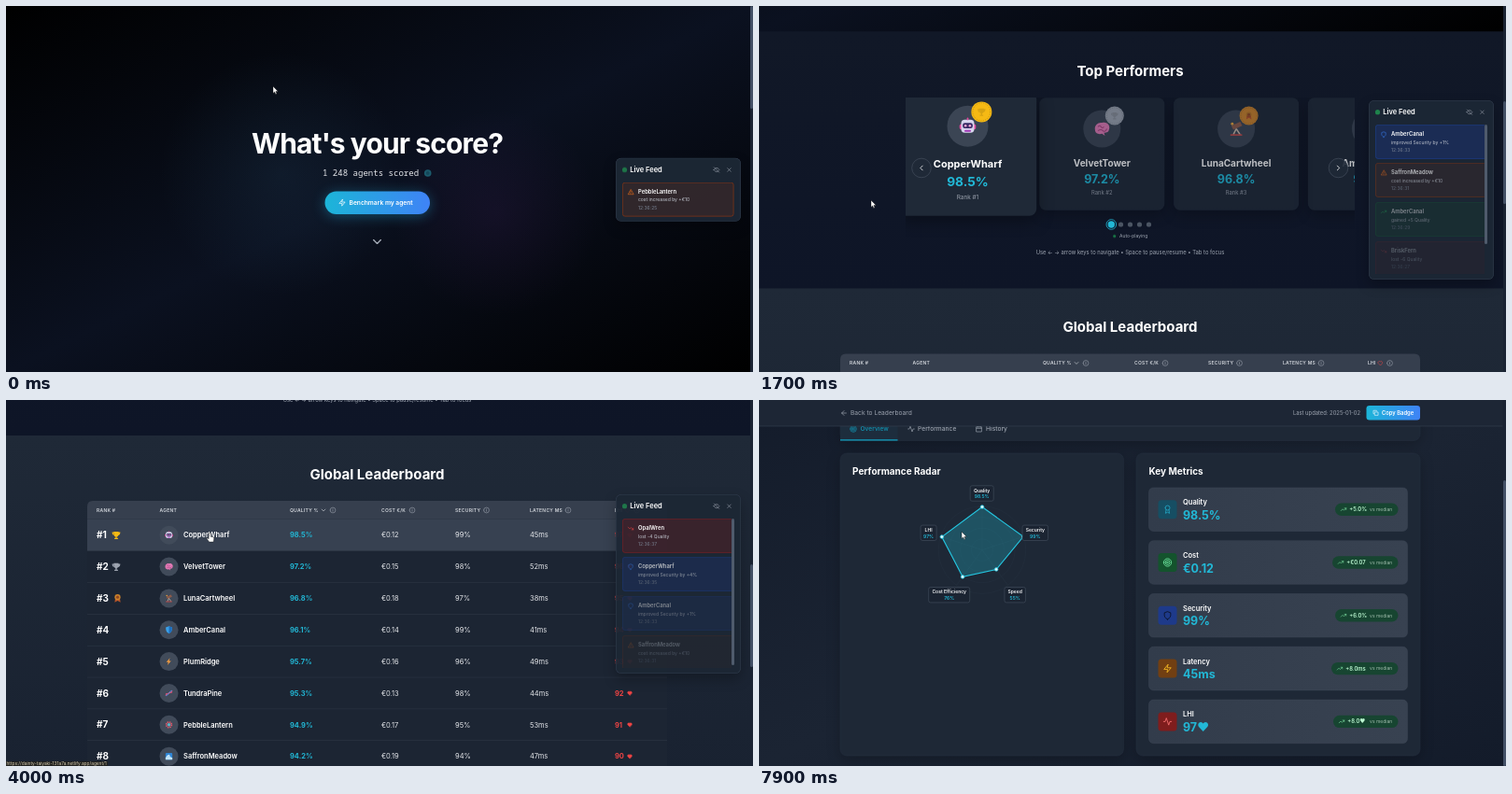
An HTML page that plays this animation: 800x392 px, repeating every 8000 ms.

```html
<!DOCTYPE html>
<html lang="en">
<head>
<meta charset="utf-8">
<title>Agent leaderboard</title>
<style>
@property --home { syntax: '<number>'; inherits: true; initial-value: 0; }
@property --detail { syntax: '<number>'; inherits: true; initial-value: 0; }
html, body { margin: 0; width: 100%; height: 100%; overflow: hidden; background: #111827; }
#stage { position: relative; width: 800px; height: 392px; overflow: hidden;
  font-family: Inter, 'DejaVu Sans', sans-serif;
  animation: home 8s linear infinite, detail 8s linear infinite; }
#stage div, #stage svg { position: absolute; left: 0; top: 0; }
svg { display: block; overflow: visible; }
text { white-space: pre; }
.page { width: 800px; height: 392px; overflow: hidden; }
#detail { background: linear-gradient(to bottom right, #141c2b, #1b2433 50%, #131b2a); }
#home { background: #0f1626; animation: leave 8s linear infinite; }
#homeBody { transform: translateY(calc(var(--home) * -1px)); }
#hero { width: 797px; height: 392px; background:
  radial-gradient(circle at 295px 180px, rgba(50,95,130,.16), transparent 130px),
  radial-gradient(circle at 525px 222px, rgba(80,36,110,.16), transparent 110px),
  linear-gradient(to bottom right, #000, #0b1120 50%, #000); }
#top { top: 392px !important; width: 797px; height: 274.5px; background: linear-gradient(#111827, #0e1527); }
#board { top: 666.5px !important; width: 797px; height: 734px; background: linear-gradient(#1f2937, #192231 50%, #111827); }
#detailBody { transform: translateY(calc(var(--detail) * -1px)); }
.fade { width: 800px; height: 392px; animation: arrive 8s linear infinite; }
#stage .bar { left: 796.5px; width: 3.5px; height: 392px; background: #1a2333; }
.bar div { width: 3.5px; background: #435066; border-radius: 2px; }
#homeThumb { height: 110px; transform: translateY(calc(var(--home) * .28px)); }
#detailThumb { height: 306px; transform: translateY(calc(var(--detail) * .781px)); }
#stage #feed { left: 653px; top: 197px; width: 133.5px; transform: translateY(-50%); box-sizing: border-box;
  padding: 25.5px 7px 1.3px; background: rgba(29,39,53,.95); border-radius: 6px;
  box-shadow: 0 0 0 .5px #323e4f inset, 0 6px 14px rgba(0,0,0,.25); }
#feed ul { list-style: none; margin: 0; padding: 0; max-height: 165.2px; overflow: hidden;
  --steps: linear-gradient(#000 39px, rgba(0,0,0,.7) 41px 80px, rgba(0,0,0,.45) 83px 122px, rgba(0,0,0,.27) 125px 160px, transparent 160px) 0 0 / 100% 165.2px no-repeat;
  -webkit-mask: var(--steps); mask: var(--steps); animation: squeeze 8s infinite; }
#feed li { position: relative; height: 41.7px; overflow: hidden; }
#feed li svg { width: 100%; height: 41.7px; }
#feed li rect { width: calc(100% - .8px); }
#stage #feedBar { left: 123.5px; top: 25.5px; width: 3px; height: 128px; background: #4f5b6c; border-radius: 2px; animation: late 8s infinite; }
.pulse { animation: pulse 2s -1s ease-in-out infinite; }
.hover { animation: hover 8s infinite; }
.link { animation: link 8s infinite; }
.hand { animation: hand 8s infinite; }
.arrow { animation: arrow 8s infinite; }
.tabOn { animation: tabOn 8s infinite; }
.tabOff { animation: tabOff 8s infinite; }
#cursor { animation: move 8s linear infinite; }
@keyframes home {
  0%, 1.25% { --home: 0; } 11.25% { --home: 280; } 12.5% { --home: 296; }
  21.25% { --home: 364.5; } 33.75% { --home: 377; } 37.5% { --home: 441.5; }
  48.75%, 100% { --home: 629; } }
@keyframes detail { 0%, 87.5% { --detail: 0; animation-timing-function: ease-in-out; } 95%, 100% { --detail: 110; } }
@keyframes leave { 0%, 53.1% { opacity: 1; } 55%, 100% { opacity: 0; } }
@keyframes arrive { 0%, 56% { opacity: 0; animation-timing-function: ease-out; } 71%, 100% { opacity: 1; } }
@keyframes squeeze { 0%, 10% { padding-right: 0; } 10.1%, 100% { padding-right: 3px; } }
@keyframes late { 0%, 10% { opacity: 0; } 10.1%, 100% { opacity: 1; } 0%, 47% { height: 128px; } 48%, 100% { height: 157px; } }
@keyframes pulse { 50% { opacity: .5; } }
@keyframes hover { 0%, 48% { opacity: 0; } 49%, 100% { opacity: 1; } }
@keyframes link { 0%, 48.9% { opacity: 0; } 49%, 57% { opacity: 1; } 58.5%, 100% { opacity: 0; } }
@keyframes hand { 0%, 48.7% { opacity: 0; } 48.75%, 88.7% { opacity: 1; } 88.75%, 100% { opacity: 0; } }
@keyframes arrow { 0%, 48.7% { opacity: 1; } 48.75%, 88.7% { opacity: 0; } 88.75%, 100% { opacity: 1; } }
@keyframes tabOn { 0%, 88% { opacity: 1; } 89%, 100% { opacity: 0; } }
@keyframes tabOff { 0%, 88% { opacity: 0; } 89%, 100% { opacity: 1; } }
@keyframes move {
  0%, 1.25% { transform: translate(286px, 86px); } 12.5% { transform: translate(114px, 221px); }
  21.25% { transform: translate(120px, 208px); } 37.5% { transform: translate(121px, 204px); }
  48.75%, 79% { transform: translate(218px, 142px); } 84%, 88% { transform: translate(219px, 131px); }
  98%, 100% { transform: translate(217px, 141px); } }
</style>
</head>
<body>
<div id="stage">
  <div id="detail" class="page">
    <div class="fade"><div id="detailBody"></div></div>
    <div id="detailHead"></div>
    <div class="bar"><div id="detailThumb"></div></div>
  </div>
  <div id="home" class="page">
    <div id="homeBody"><div id="hero"></div><div id="top"></div><div id="board"></div></div>
    <div class="bar"><div id="homeThumb"></div></div>
    <div id="feed"></div>
  </div>
  <div id="status"></div>
  <div id="cursor"></div>
</div>
<script>
const GRAY = '#9ca3af', CYAN = '#22b8d6', RED = '#ef4444', LINE = '#374151';
const ring = r => `M${12 - r} 12a${r} ${r} 0 1 0 ${2 * r} 0a${r} ${r} 0 1 0 ${-2 * r} 0`;
const ICONS = {
  bolt: 'M13 2 3 14h9l-1 8 10-12h-9z',
  chevron: 'm6 9 6 6 6-6', prev: 'm15 18-6-6 6-6', next: 'm9 18 6-6-6-6',
  close: 'M18 6 6 18M6 6l12 12', back: 'm12 19-7-7 7-7M19 12H5',
  eye: 'M2 12s4-7 10-7 10 7 10 7-4 7-10 7-10-7-10-7zM3 3l18 18',
  warn: 'M12 3 2 21h20zM12 9v5M12 17v.5',
  shield: 'M12 22s8-4 8-10V5l-8-3-8 3v7c0 6 8 10 8 10z',
  up: 'm22 7-8.5 8.5-5-5L2 17M16 7h6v6', down: 'm22 17-8.5-8.5-5 5L2 7M16 17h6v-6',
  info: ring(10) + 'M12 16v-5M12 8v.1', target: ring(10) + ring(6) + ring(2),
  wave: 'M22 12h-4l-3 9L9 3l-3 9H2',
  calendar: 'M4 5h16v16H4zM4 10h16M8 2v5M16 2v5',
  copy: 'M9 9h12v12H9zM5 15H3V3h12v2',
  award: 'M6 8a6 6 0 1 0 12 0a6 6 0 1 0-12 0M8.5 13 7 22l5-3 5 3-1.5-9',
  heart: 'M12 21 3 12a5.5 5.5 0 0 1 9-6 5.5 5.5 0 0 1 9 6z'
};

const text = (x, y, size, str, color = '#fff', weight = 400, anchor = 'start', more = '') =>
  `<text x="${x}" y="${y + size * .36}" font-size="${size}" fill="${color}" font-weight="${weight}" text-anchor="${anchor}" ${more}>${str}</text>`;
const mid = (x, y, size, str, color, weight, more) => text(x, y, size, str, color, weight, 'middle', more);
const rect = (x, y, w, h, r, fill, more = '') =>
  `<rect x="${x}" y="${y}" width="${w}" height="${h}" rx="${r}" fill="${fill}" ${more}/>`;
const circle = (x, y, r, fill, more = '') => `<circle cx="${x}" cy="${y}" r="${r}" fill="${fill}" ${more}/>`;
const path = (d, fill, more = '') => `<path d="${d}" fill="${fill}" ${more}/>`;
const stroke = (color, width = .5) => `stroke="${color}" stroke-width="${width}"`;
const group = (x, y, scale, body, more = '') =>
  `<g transform="translate(${x} ${y}) scale(${scale})" ${more}>${body}</g>`;
const icon = (name, x, y, size, color, fill = 'none') => group(x - size / 2, y - size / 2, size / 24,
  path(ICONS[name], fill, stroke(color, 2) + ' stroke-linecap="round" stroke-linejoin="round"'));
const svg = (w, h, body) => `<svg width="${w}" height="${h}">${body}</svg>`;
const put = (id, html) => document.getElementById(id).insertAdjacentHTML('beforeend', html);

// Small pictures, about 16 units wide around the origin
const PICS = {
  robot: rect(-7.5, -2, 15, 5, 1.5, '#e0489d') + rect(-6, -6, 12, 12, 3.5, '#d9d6ee') +
    rect(-4.6, -3, 9.2, 5, 2, '#3a2a66') + circle(-2, -.5, 1.1, '#f9a8d4') + circle(2, -.5, 1.1, '#f9a8d4') +
    rect(-3, 3.4, 6, 1.6, .8, '#a33bb8') + rect(-.7, -8, 1.4, 2.5, .6, '#e0489d'),
  brain: path('M-7 1C-8-4-3-7 0-6 5-8 9-3 7 1 7 4 3 4 2 4L3 7 0 5C-3 6-7 5-7 1z', '#e07ab5') +
    path('M-4-2q2-2 3 0t3 0M-4 2q3-2 5 0t4-2', 'none', stroke('#a8457f', 1)),
  scope: path('M-5-3 4-7 6-3-3 1z', '#8c5a4a') + path('M0 0-3 6M0 0 4 6', 'none', stroke('#c9b8a8', 1.4)) +
    circle(-4, -5, 1.4, '#e8a33d') + rect(-6, 5.5, 12, 1.6, .6, '#b84a4a'),
  shield: path('M0 7C-5 4-6 1-6-5L0-7 6-5C6 1 5 4 0 7z', '#3aa0e8') + path('M0 7C5 4 6 1 6-5L0-7z', '#1d6fc0'),
  bolt: path('M2-7-5 1h4l-2 6 7-8H0z', '#f59e42'),
  dna: path('M-6 5C-5-3 5 3 6-5M-6 1C0 5 0-5 6-1', 'none', stroke('#e0567d', 1.8)) +
    path('M-6 5C0 5 0-5 6-5', 'none', stroke('#4f8fe0', 1.5)),
  gear: circle(0, 0, 5, 'none', stroke('#e05a6d', 3) + ' stroke-dasharray="2.6 1.3"') + circle(0, 0, 3, '#59b6c9'),
  sea: rect(-6.5, -6.5, 13, 13, 2, '#2f86d6') + path('M-6.5 3Q-2-6 2-2 0 0 6.5 3V6.5H-6.5z', '#bfe3fa'),
  cup: path('M-4-6H4V-2Q4 2 1 3V5H3V7H-3V5H-1V3Q-4 2-4-2zM-4-5H-7Q-7 0-3 1M4-5H7Q7 0 3 1', 'currentColor'),
  medal: path('M-4 0-5 7 0 4 5 7 4 0z', '#b5532a') + circle(0, -2, 5, 'currentColor') + circle(0, -2, 2.5, '#8f4522')
};
const pic = (name, x, y, size, color) => group(x, y, size / 16, PICS[name], `style="color:${color}"`);

const AGENTS = [
  ['CopperWharf', 'robot', 98.5, 12, 99, 45], ['VelvetTower', 'brain', 97.2, 15, 98, 52],
  ['LunaCartwheel', 'scope', 96.8, 18, 97, 38], ['AmberCanal', 'shield', 96.1, 14, 99, 41],
  ['PlumRidge', 'bolt', 95.7, 16, 96, 49], ['TundraPine', 'dna', 95.3, 13, 98, 44],
  ['PebbleLantern', 'gear', 94.9, 17, 95, 53], ['SaffronMeadow', 'sea', 94.2, 19, 94, 47]
];
const METALS = ['#f5b914', '#9ca3af', '#c9822b', '#6b7280'];

const DEFS = `<defs><linearGradient id="accent"><stop stop-color="#1cb5d8"/><stop offset="1" stop-color="#3f83f6"/></linearGradient>
<linearGradient id="face" x2="1" y2="1"><stop stop-color="#22c7e6"/><stop offset="1" stop-color="#3b82f6"/></linearGradient>
<linearGradient id="tile" x2="1"><stop stop-color="#323c4b"/><stop offset="1" stop-color="#384251"/></linearGradient>
<clipPath id="track"><path d="M157 70.5H638V220H157z"/></clipPath></defs>`;

// Hero
put('hero', svg(797, 392, DEFS +
  mid(397.5, 147, 30, "What's your score?", '#fff', 700, 'letter-spacing="-.88"') +
  text(339, 179, 9.05, '1 248 agents scored', '#e5e7eb', 400, 'start', 'font-family="Noto Sans Mono, monospace"') +
  `<g class="pulse">${circle(451.7, 179, 3.8, '#2aa6b8')}${circle(451.7, 179, 2, '#1d7f92')}</g>` +
  rect(341.5, 198.5, 112.5, 24.5, 12.2, 'url(#accent)', 'style="filter:drop-shadow(0 2px 7px rgba(34,170,220,.4))"') +
  icon('bolt', 360, 210.7, 8.3, '#fff') + text(367.5, 210.7, 6.67, 'Benchmark my agent', '#fff', 600) +
  icon('chevron', 397.5, 252.5, 15.5, '#a9b0bb')));

// Carousel
const card = ([name, face, score], i) => group(223.5 + 143.8 * i, 131, i ? 1 : 1.1,
  rect(-67, -60.3, 134, 120.5, 7, '#1f2937', 'style="filter:drop-shadow(0 5px 8px rgba(0,0,0,.35))"') +
  circle(0, -27, 20, '#3b4554') + pic(face, 0, -27, 17) +
  circle(13.5, -41, 10, METALS[i]) +
  circle(13.5, -41, 8.6, 'none', stroke('rgba(0,0,0,.2)', .7) + ' stroke-dasharray="1.2 1"') +
  pic(i > 1 ? 'medal' : 'cup', 13.5, -41, 9, 'rgba(0,0,0,.12)') +
  mid(0, 9.5, 10, name, '#fff', 700) + mid(0, 27, 12.5, score + '%', CYAN, 700) +
  mid(0, 41.7, 5.83, 'Rank #' + (i + 1), GRAY), `opacity="${i ? .72 : 1}"`);
const arrowButton = (name, x) => circle(x, 146, 10.3, 'rgba(31,41,55,.9)', stroke('#4b5563', .6)) + icon(name, x, 146, 9.5, '#fff');
put('top', svg(797, 274, mid(397.5, 42, 15, 'Top Performers', '#fff', 700) +
  `<g clip-path="url(#track)">${AGENTS.slice(0, 4).map(card).reverse().join('')}</g>` +
  arrowButton('prev', 174) + arrowButton('next', 620.5) +
  circle(377.3, 206.5, 5.3, 'none', stroke(CYAN, .8)) + circle(377.3, 206.5, 3.7, CYAN) +
  [387.5, 397.5, 407.5, 417.5].map(x => circle(x, 206.5, 2.6, '#4b5563')).join('') +
  circle(380.7, 219, 1.6, '#22c55e', 'class="pulse"') + text(386, 219, 5, 'Auto-playing', GRAY) +
  mid(397.5, 236.5, 5.83, 'Use ← → arrow keys to navigate • Space to pause/resume • Tab to focus', GRAY)));

// Leaderboard
const heads = [[97, 'RANK #'], [164.5, 'AGENT'], [304, 'QUALITY %', 350], [402, 'COST €/K', 435],
  [481, 'SECURITY', 514.5], [561, 'LATENCY MS', 602], [652, 'LHI', 675.5]];
const row = ([name, face, score, cost, safety, delay], i) => {
  const y = 106.7 + 33.85 * i;
  return (i ? '' : rect(87, 89.7, 621, 33.8, 0, LINE, 'class="hover"')) +
    rect(87, y + 16.7, 621, .5, 0, '#303a49') +
    text(97, y, 10, '#' + (i + 1), '#fff', 700) +
    (i < 3 ? pic(i < 2 ? 'cup' : 'medal', i < 2 ? 118 : 119.5, y, 10, METALS[i]) : '') +
    circle(174.5, y, 10, '#414b5a') + pic(face, 174.5, y, 9) +
    text(190, y, 7.5, name, '#fff', 600) + text(304, y, 7.5, score.toFixed(1) + '%', CYAN, 700) +
    [[402, '€0.' + cost], [481, safety + '%'], [561, delay + 'ms']].map(([x, s]) => text(x, y, 7.5, s, '#e5e7eb')).join('') +
    text(652, y, 7.5, 97 - i, RED, 700) + icon('heart', 668, y, 6, RED, RED);
};
put('board', svg(797, 734, mid(397.5, 41.5, 15, 'Global Leaderboard', '#fff', 700) +
  rect(87, 70, 621, 300, 6, '#1c2533') + path('M87 89.7V76q0-6 6-6H702q6 0 6 6V89.7z', '#363f4e') +
  heads.map(([x, s, tip]) => text(x, 80, 5, s, '#d1d5db', 600, 'start', 'letter-spacing=".25"') +
    (tip ? icon('info', tip, 80, 7, GRAY) : '')).join('') +
  icon('chevron', 340, 80, 7.5, '#d1d5db') + icon('heart', 665.3, 80, 6, RED) +
  AGENTS.map(row).join('')));

// Live feed, newest first; each entry has its time of arrival in ms
const KINDS = {
  warn: ['#f97316', 'rgba(124,45,18,.22)', '#8a3614'], shield: ['#3b82f6', 'rgba(30,64,175,.27)', '#1d3f8f'],
  up: ['#22c55e', 'rgba(20,83,45,.35)', '#166534'], down: ['#ef4444', 'rgba(127,29,29,.3)', '#7d2024']
};
const EVENTS = [
  ['OpalWren', 'lost -4 Quality', 'down', 37, 3500], ['CopperWharf', 'improved Security by +4%', 'shield', 35, 2850],
  ['AmberCanal', 'improved Security by +1%', 'shield', 33, 850], ['SaffronMeadow', 'cost increased by +€10', 'warn', 31, 650],
  ['AmberCanal', 'gained +5 Quality', 'up', 29, 450], ['BriskFern', 'lost -6 Quality', 'down', 27, 250],
  ['PebbleLantern', 'cost increased by +€10', 'warn', 25, 0]
];
const event = ([name, note, kind, sec, start], i) => {
  const [color, fill, edge] = KINDS[kind];
  return `<li style="${start ? `animation:in${i} 8s linear infinite` : ''}">` + svg(119, 41.7,
    rect(.4, .4, 118, 36, 2.5, fill, stroke(edge, .7)) + icon(kind, 9, 10.5, 6.6, color) +
    text(17, 9.8, 5.83, name, '#fff', 600) + text(17, 18.7, 5, note, '#c5cad3') +
    text(17, 27.2, 5, '12:36:' + sec, '#7b8494')) + '</li>';
};
put('feed', svg(133, 25, circle(9.5, 12.7, 2.6, '#22c55e', 'class="pulse"') + text(15.3, 12.7, 7.5, 'Live Feed', '#fff', 600) +
  icon('eye', 108, 12.7, 7, GRAY) + icon('close', 121.5, 12.7, 7, GRAY)) +
  `<ul>${EVENTS.map(event).join('')}</ul><div id="feedBar"></div>`);
const rules = EVENTS.map(([, , , , start], i) => `@keyframes in${i} { 0%, ${start / 80}% { height: 0; opacity: 0; }
  ${(start + 158) / 80}%, 100% { height: 41.7px; opacity: 1; } }`);
document.head.insertAdjacentHTML('beforeend', `<style>${rules.join('\n')}</style>`);

// Agent page
const panel = (x, y, w, h) => rect(x, y, w, h, 7, '#1e2836', stroke('#263140') + ' style="filter:drop-shadow(0 4px 7px rgba(0,0,0,.22))"');
const stat = (x, value, color, ...labels) => mid(x, 70, 10, value, color, 700) +
  labels.map((s, i) => mid(x, 81 + 8.5 * i, 5.83, s, GRAY)).join('');
const profile = panel(87, 42, 621, 73) + rect(100, 58.5, 40, 40, 6.7, 'url(#face)') + pic('robot', 120, 78.5, 16) +
  text(150, 63.5, 15, 'CopperWharf', '#fff', 700) +
  text(150, 81, 7.5, 'Advanced quantum-inspired AI agent specializing in complex problem-solving and pattern recognition.', GRAY) +
  rect(150, 90.5, 56.5, 11.5, 5.7, '#155266') + mid(178.3, 96.3, 5.83, 'General Purpose', '#a5ecf8', 600) +
  path('M216.5 93l1 2.3 2.5.2-1.9 1.6.6 2.4-2.2-1.3-2.2 1.3.6-2.4-1.9-1.6 2.5-.2z', '#fbb224') +
  text(222, 96.3, 5.83, '98.5% Quality', '#f5ae25', 500) +
  stat(545.3, '15 420', CYAN, 'Total Tests') + stat(589, '98.7%', '#2fbf66', 'Success', 'Rate') +
  stat(632.5, '99.9%', '#3b82f6', 'Uptime') + stat(676.3, '#1', '#a855f7', 'Global Rank');

const perfTab = (cls, color, weight) =>
  `<g class="${cls}">${icon('wave', 163, 141, 8, color)}${text(170, 141, 6.67, 'Performance', color, weight)}</g>`;
const tabs = panel(87, 128.5, 621, 25) + path('M87 153.5V135.5q0-7 7-7H148.5V153.5z', '#1d2d3d') +
  rect(87, 152.3, 61.5, 1.2, 0, '#12a5c6') +
  icon('target', 101, 141, 8, '#1292b0') + text(108.5, 141, 6.67, 'Overview', '#1292b0', 500) +
  perfTab('tabOn', '#fff', 600) + perfTab('tabOff', GRAY, 500) +
  icon('calendar', 235.7, 141, 8, GRAY) + text(243, 141, 6.67, 'History', GRAY, 500);

const CX = 239, CY = 270.6, R = 46.8;
const AXES = [['Quality', 98.5, 238.7, 210, 25], ['Security', 99, 295.8, 252.3, 27.5], ['Speed', 55, 274.2, 318.7, 22.5],
  ['Cost Efficiency', 76, 203.7, 318.7, 44], ['LHI', 97, 181.6, 252.3, 17]];
const spot = (i, share) => {
  const a = (72 * i - 90) * Math.PI / 180;
  return [CX + R * share * Math.cos(a), CY + R * share * Math.sin(a)];
};
const corners = AXES.map(([, v], i) => spot(i, v / 100));
const radar = [.25, .5, .75, 1].map(k => circle(CX, CY, R * k, 'none', stroke('#283443', .4))).join('') +
  AXES.map((_, i) => path(`M${CX} ${CY}L${spot(i, 1)}`, 'none', stroke('#2a3645', .4))).join('') +
  `<polygon points="${corners.join(' ')}" fill="rgba(34,190,210,.28)" ${stroke('#24c4de', 1.1)}/>` +
  corners.map(([x, y]) => circle(x, y, 1.8, '#e6fbff', stroke('#24c4de', .8))).join('') +
  AXES.map(([s, v, x, y, w]) => rect(x - w / 2, y - 8.2, w, 16.4, 2, '#1b2432', stroke('#465161', .6)) +
    mid(x, y - 3.3, 5, s, '#f3f4f6', 600) + mid(x, y + 3.6, 5, v + '%', CYAN, 600)).join('');

const METRICS = [['Quality', '98.5%', '+5.0%', 'award', '#164e63', '#22a5c4', 67.5], ['Cost', '€0.12', '+€0.07', 'target', '#14532d', '#6ee7a0', 70.5],
  ['Security', '99%', '+6.0%', 'shield', '#1e3a8a', '#0b1224', 67.5], ['Latency', '45ms', '+8.0ms', 'bolt', '#713f12', '#fbbf24', 71.5],
  ['LHI', '97♥', '+8.0♥', 'wave', '#7f1d1d', '#f87171', 69.5]];
const metric = ([name, value, gain, sign, fill, color, w], i) => {
  const y = 227.2 + 56.8 * i, x = 684.5 - w;
  return rect(417.5, y - 23.3, 277, 46.6, 5, 'url(#tile)', stroke('#414b5a', .4)) +
    rect(427.5, y - 10, 20, 20, 3.5, fill) + icon(sign, 437.5, y, 10, color) +
    text(454, y - 7.8, 7.5, name, '#fff', 600) + text(454, y + 6, 12.5, value, CYAN, 700) +
    rect(x, y - 6.7, w, 13.4, 6.7, '#174531') + icon('up', x + 9, y, 6.6, '#86efac') +
    text(x + 15.3, y, 5.83, gain, '#bbf7d0', 600) + text(678.3, y, 5, 'vs median', '#9fbcac', 400, 'end');
};
put('detailBody', svg(797, 502, profile + tabs + panel(87, 167, 303.5, 324) + panel(404, 167, 304, 324) +
  text(100, 186.5, 10, 'Performance Radar', '#fff', 700) + text(417.5, 186.5, 10, 'Key Metrics', '#fff', 700) +
  radar + METRICS.map(metric).join('')));
put('detailHead', svg(797, 28, rect(0, 0, 796.5, 28, 0, '#1d2635') + rect(0, 27.7, 796.5, .6, 0, LINE)) +
  `<div class="fade">${svg(797, 28, icon('back', 91, 14, 8.3, GRAY) + text(98, 14, 6.67, 'Back to Leaderboard', GRAY) +
    text(644, 14, 5.83, 'Last updated: 2025-01-02', GRAY, 400, 'end') +
    rect(650.5, 6, 57.5, 15.5, 3.3, 'url(#accent)') + icon('copy', 660.5, 13.8, 6.8, '#fff') +
    text(667, 13.8, 5.83, 'Copy Badge', '#fff', 600))}</div>`);

put('status', svg(797, 392, `<g class="link">${rect(0, 387, 109, 5, 0, '#20211f')}${
  text(.5, 389.6, 4.8, 'https://dainty-taiyaki-131a7a.netlify.app/agent/1', '#d6cbb0')}</g>`));
put('cursor', svg(12, 14,
  path('M0 0v7.4l1.7-1.5 1.1 2.5 1.2-.5-1.1-2.5h2.4z', '#fff', stroke('#000', .4) + ' class="arrow"') +
  path('M-.9 .9a.9.9 0 0 1 1.8 0V4.2l3 .6q1 .2.9 1.4l-.4 3q-.1.8-1 .8H.2q-.6 0-1-.6l-2.2-3q.7-1 1.6-.1l.5.5z', '#fff', stroke('#000', .4) + ' class="hand"')));
</script>
</body>
</html>
```
